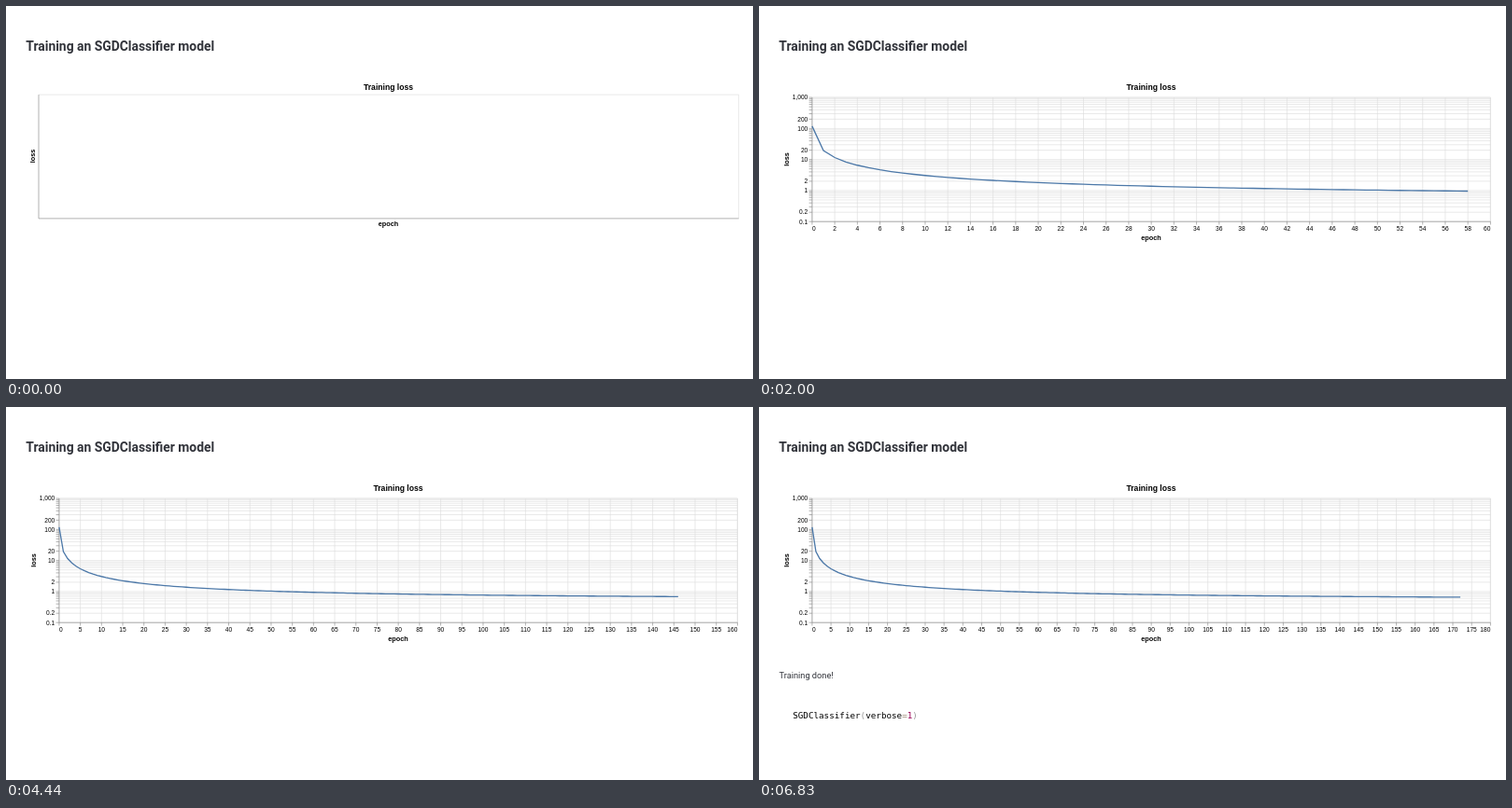
An HTML page for the animation above (7180 ms loop, 800x400 px).

```html
<!DOCTYPE html>
<html lang="en">
<head>
<meta charset="utf-8">
<title>Training loss</title>
<style>
  html, body { margin: 0; width: 100%; height: 100%; overflow: hidden; background: #fff; }
  svg { display: block; width: 800px; height: 400px; }
  text { font-family: "Liberation Sans", Arial, sans-serif; font-size: 6.61px; white-space: pre; }
  .heading { font: 700 13.88px Roboto, sans-serif; fill: #31333a; }
  .body { font: 400 9.25px Roboto, sans-serif; fill: #31333a; }
  .code { font: 400 9.25px "DejaVu Sans Mono", monospace; }
  .title { font-size: 8.6px; font-weight: 700; }
  .axis { font-size: 7.27px; font-weight: 700; }
  .mid { text-anchor: middle; }
  .end { text-anchor: end; }
  path { fill: none; stroke-width: .66; }
  .grid { stroke: #ddd; }
  .rule { stroke: #888; }
  .loss { stroke: #4c78a8; stroke-width: 1.32; stroke-linejoin: miter; }
</style>
</head>
<body>
<svg id="stage" viewBox="0 0 800 400"></svg>
<script>
const LOOP = 7180;
const LAST_EPOCH = 172;
// [time in ms, last epoch drawn]
const UPDATES = [
  [0, -1], [700, 4], [1160, 22], [1510, 40], [2000, 58], [2530, 76], [3010, 93],
  [3470, 111], [3990, 128], [4440, 146], [4960, 163], [5930, LAST_EPOCH]
];
const stage = document.getElementById('stage');

const text = (x, y, content, cls = '', extra = '') =>
  `<text x="${x}" y="${y}" class="${cls}" ${extra}>${content}</text>`;
const path = (d, cls) => `<path class="${cls}" d="${d}"/>`;
const loss = epoch => epoch ? 0.505 + 26.6 / (epoch + 0.4) : 119;

// Round step (1, 2 or 5 times a power of ten) that splits span into about count parts
function roundStep(span, count) {
  const raw = span / count;
  const power = 10 ** Math.floor(Math.log10(raw));
  const ratio = raw / power;
  const factor = ratio >= Math.sqrt(50) ? 10 : ratio >= Math.sqrt(10) ? 5 : ratio >= Math.sqrt(2) ? 2 : 1;
  return factor * power;
}

function frame(left, top, right, bottom) {
  return path(`M${left} ${top}H${right}V${bottom}`, 'grid');
}

function axes(left, top, right, bottom) {
  return path(`M${left} ${top}V${bottom}H${right}`, 'rule');
}

function titles(center, epochY, lossX, lossY) {
  return text(center, 90, 'Training loss', 'title mid') +
    text(center, epochY, 'epoch', 'axis mid') +
    text(0, 0, 'loss', 'axis mid', `transform="translate(${lossX} ${lossY}) rotate(-90)"`);
}

function emptyChart() {
  const box = [35, 95.1, 784.7, 227.9];
  return frame(...box) + axes(...box) + titles(409.5, 236, 31.2, 161);
}

function chart(lastEpoch) {
  const box = [56.9, 98.1, 783.4, 231.2];
  const [left, top, right, bottom] = box;
  const niceStep = roundStep(lastEpoch, 10);
  const xMax = Math.ceil(lastEpoch / niceStep - 1e-9) * niceStep;
  const minPower = loss(lastEpoch) < 1 ? -1 : 0;
  const decades = 3 - minPower;
  const x = epoch => left + (right - left) * epoch / xMax;
  const y = value => bottom - (bottom - top) * (Math.log10(value) - minPower) / decades;
  let grid = '', ticks = '', labels = '';

  const step = roundStep(xMax, 28);
  const count = Math.round(xMax / step);
  for (let i = 0; i <= count; i++) {
    const px = x(i * step);
    grid += `M${px} ${top}V${bottom}`;
    ticks += `M${px} ${bottom}v3.3`;
    const anchor = i === 0 ? '' : i === count ? 'end' : 'mid';
    labels += text(px, 241.4, (i * step).toFixed(step < 1 ? 1 : 0), anchor);
  }

  const maxLabelled = decades === 3 ? 3 : 2;
  for (let power = minPower; power <= 3; power++) {
    for (let digit = 1; digit <= (power === 3 ? 1 : 9); digit++) {
      const value = digit * 10 ** power;
      const py = y(value);
      grid += `M${left} ${py}H${right}`;
      ticks += `M${left} ${py}h-3.3`;
      if (digit <= maxLabelled) labels += text(52.3, py + 2.3, value.toLocaleString('en-US'), 'end');
    }
  }

  let line = '';
  for (let epoch = 0; epoch <= lastEpoch; epoch++) {
    line += `${epoch ? 'L' : 'M'}${x(epoch).toFixed(2)} ${y(loss(epoch)).toFixed(2)}`;
  }
  return path(grid, 'grid') + frame(...box) + path(ticks, 'rule') + axes(...box) +
    path(line, 'loss') + labels + titles(420, 251, 31.9, 164.5);
}

function summary() {
  const code = 'SGDClassifier<tspan fill="#999">(</tspan>verbose' +
    '<tspan fill="#9a8672">=</tspan><tspan fill="#905">1</tspan><tspan fill="#999">)</tspan>';
  return text(21.5, 291, 'Training done!', 'body') + text(36.2, 333.8, code, 'code');
}

let shown = null;
function render(now) {
  const time = now % LOOP;
  const epoch = UPDATES.findLast(([start]) => start <= time)[1];
  if (epoch !== shown) {
    shown = epoch;
    stage.innerHTML = text(21.3, 47.7, 'Training an SGDClassifier model', 'heading') +
      (epoch < 0 ? emptyChart() : chart(epoch)) +
      (epoch === LAST_EPOCH ? summary() : '');
  }
  requestAnimationFrame(render);
}
render(0);
</script>
</body>
</html>
```
